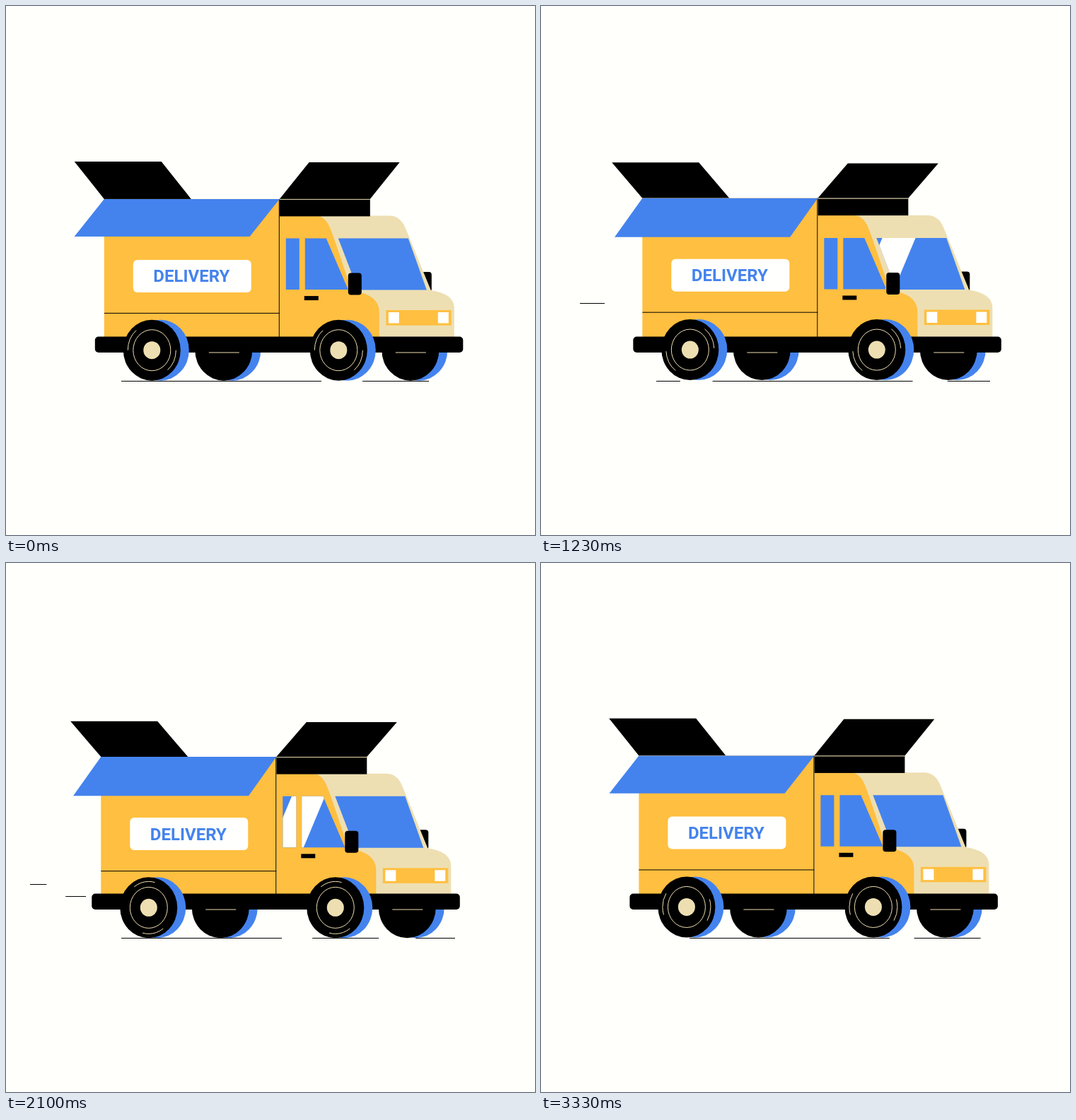
An HTML page that plays this animation: 748x748 px, repeating every 3.36 s.

```html
<!DOCTYPE html>
<html lang="en">
<head>
<meta charset="utf-8">
<title>Delivery van</title>
<style>
  html, body { margin: 0; width: 100%; height: 100%; overflow: hidden; background: #fffffb; }
  svg { display: block; width: 100vw; height: 100vh; }
  .orange { fill: #ffbf40; }
  .cream { fill: #eedfb2; }
  .blue { fill: #4483ee; }
  .white { fill: #fffffd; }
  .line { fill: none; stroke: #000; }
  .shine { fill: none; stroke: #eedfb2; }
  text { font: 700 24px Roboto, sans-serif; text-anchor: middle; }
</style>
</head>
<body>
<svg viewBox="0 0 748 748">
  <defs>
    <g id="tyre">
      <ellipse class="blue" cx="12" rx="40.5" ry="43"/>
      <ellipse rx="40.5" ry="43"/>
    </g>
    <g id="wheel">
      <use href="#tyre"/>
      <ellipse class="shine" rx="26.5" ry="29"/>
      <ellipse id="spin" class="shine" rx="34" ry="37" pathLength="100" stroke-dasharray="14 36"/>
      <ellipse class="cream" rx="12" ry="12.5"/>
    </g>
    <path id="windshield" d="M470 329.500H569L595 402.500H498Z"/>
    <path id="sideWindows" d="M396 329.500h19v72.500h-19ZM423 329.500H453L484 402H423Z"/>
    <path id="glare" d="M0 403L31 329H78L47 403Z"/>
    <clipPath id="frontClip"><use href="#windshield"/></clipPath>
    <clipPath id="sideClip"><use href="#sideWindows"/></clipPath>
  </defs>

  <g class="line">
    <path id="roadLong" d="M163 530.500H635" stroke-dasharray="283 189"/>
    <path id="roadShort" d="M163 530.500H635" stroke-dasharray="94 378"/>
    <g id="wind" stroke-dasharray="35 999">
      <path d="M116 454.500H34"/>
      <path d="M113 471.500H31"/>
      <path d="M127 420.500H45"/>
    </g>
  </g>

  <g id="truck">
    <g class="bounce">
      <use href="#tyre" x="308" y="487"/>
      <use href="#tyre" x="572" y="487"/>
    </g>

    <g id="cab">
      <rect x="586" y="377" width="16" height="28" rx="4"/>
      <path class="cream" d="M430 297.500H542Q558 297.500 565 315L601 403Q634 408 634 428V475H430Z"/>
      <path class="orange" d="M387 297.500H438Q451 297.500 458 314Q463 325 489 404Q528 408 528 434V475H387Z"/>
      <use href="#windshield" class="blue"/>
      <use href="#sideWindows" class="blue"/>
      <g clip-path="url(#frontClip)"><use id="frontGlare" href="#glare" class="white"/></g>
      <g clip-path="url(#sideClip)"><use id="sideGlare" href="#glare" class="white"/></g>
      <rect x="484" y="378.500" width="19" height="31" rx="4"/>
      <rect x="422" y="411" width="20" height="6"/>
      <rect class="orange" x="537.500" y="431" width="92.500" height="21.500"/>
      <path class="white" d="M541 434h15v15.500h-15ZM611 434h15v15.500h-15Z"/>
    </g>

    <g id="body">
      <path id="flapLeft"/>
      <path id="flapRight"/>
      <rect x="387" y="273" width="128" height="24.500"/>
      <path class="shine" d="M387 273.500H515"/>
      <rect class="orange" x="139" y="273" width="248" height="202"/>
      <path class="line" d="M386.500 273V475M139 434.500H387"/>
      <rect class="white" x="180" y="359" width="167" height="46" rx="6"/>
      <text class="blue" x="262.500" y="390.500">DELIVERY</text>
      <path id="flapFront" class="blue"/>
    </g>

    <rect x="126" y="467.500" width="520.500" height="22.500" rx="5"/>
    <path class="shine" d="M287 490H330M551 490H594"/>
    <g class="bounce">
      <use href="#wheel" x="206.500" y="487"/>
      <use href="#wheel" x="470.500" y="487"/>
    </g>
  </g>
</svg>
<script>
const LOOP = 3360, STEPS = 100, CYCLE = 20, ROAD = 472;
const TAU = 2 * Math.PI;
const $ = id => document.getElementById(id);
const windStarts = [0, 9, 27];
const windLines = [...$('wind').children];
const bouncers = document.querySelectorAll('.bounce');

const set = (el, name, value) => el.setAttribute(name, value);
const move = (el, x, y = 0) => set(el, 'transform', `translate(${x} ${y})`);
const dash = (el, offset) => set(el, 'stroke-dashoffset', offset);

// Parallelogram hinged along the roof line
function flap(id, x, width, dx, dy) {
  set($(id), 'd', `M${x} 273h${width}l${dx} ${dy}h${-width}Z`);
}

function draw(now) {
  // Motion runs at about 30 poses per second
  const step = Math.round((now % LOOP) / LOOP * STEPS) % STEPS;
  const wave = (lag = 0) => Math.sin(TAU * (step - lag) / CYCLE);
  const swing = Math.cos(TAU * step / CYCLE);

  move($('truck'), 6.2 * Math.sin(TAU * step / STEPS) - 0.2);
  move($('body'), 0, 1.5 * wave() - 0.1);
  move($('cab'), 0, 1.4 * wave(2) - 0.1);
  bouncers.forEach(el => move(el, 0, 0.8 * wave() - 0.3));

  flap('flapLeft', 139, 123, -44.5 + 2.4 * swing, -46.5 - 6.5 * swing);
  flap('flapRight', 387, 128, 43.5 - 1.7 * swing, -45 - 7 * swing);
  flap('flapFront', 139, 248, -35 - 7.2 * swing, 58.2 - 5.2 * swing);

  move($('frontGlare'), 601 - 4.15 * step);
  move($('sideGlare'), 630 - 4 * step);

  dash($('spin'), -100 * step / CYCLE);
  dash($('roadLong'), ROAD * 0.0495 * step);
  dash($('roadShort'), ROAD * 0.05 * step - 341);
  windLines.forEach((el, i) => dash(el, 35 - 7.2 * (step % 50 - windStarts[i])));
}

function tick() {
  draw(performance.now());
  requestAnimationFrame(tick);
}
tick();
</script>
</body>
</html>
```
